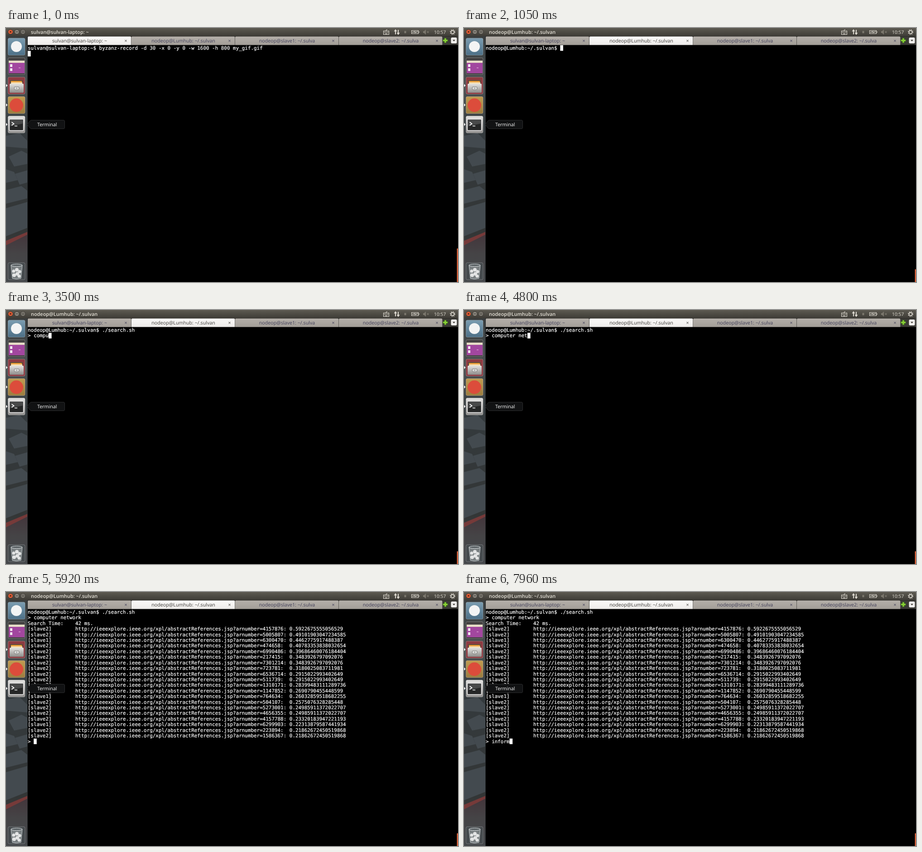
These frames come from a looping animation (998 px wide and 561 px high, 8000 ms). An HTML page:

```html
<!DOCTYPE html>
<html lang="en">
<head>
<meta charset="utf-8">
<title>Terminal search</title>
<style>
html, body { margin: 0; width: 100%; height: 100%; overflow: hidden; background: #000; }
svg { display: block; width: 998px; height: 561px; }
text { text-rendering: geometricPrecision; white-space: pre; }
.ui { font-family: "Open Sans", "Noto Sans", sans-serif; font-size: 10.7px; }
.mono { font-family: "DejaVu Sans Mono", monospace; font-size: 10.92px; fill: #fff; stroke: #fff; stroke-width: .22px; }
.title { font-weight: 600; font-size: 10.9px; fill: #e6e2d8; }
.tab path { fill: url(#tabOff); }
.tab.on path { fill: url(#tabOn); }
.tab text { fill: #42405a; text-anchor: middle; }
.tab.on text { fill: #403e3b; }
.panel { fill: none; stroke: #dfdbd2; stroke-width: 1.1; }
.panel.dim { stroke: #7b776d; }
</style>
</head>
<body>
<svg viewBox="0 0 998 561" xmlns="http://www.w3.org/2000/svg">
  <defs>
    <linearGradient id="bar" x2="0" y2="1"><stop stop-color="#5d5a51"/><stop offset="1" stop-color="#3d3b36"/></linearGradient>
    <linearGradient id="tabOn" x2="0" y2="1"><stop stop-color="#fbfaf9"/><stop offset="1" stop-color="#edebe9"/></linearGradient>
    <linearGradient id="tabOff" x2="0" y2="1"><stop stop-color="#b4afa9"/><stop offset="1" stop-color="#a39e98"/></linearGradient>
    <linearGradient id="photo" x2="0" y2="1">
      <stop stop-color="#393d3e"/><stop offset=".2" stop-color="#4a5051"/><stop offset=".4" stop-color="#343a3d"/>
      <stop offset=".8" stop-color="#333636"/><stop offset="1" stop-color="#434648"/>
    </linearGradient>
    <linearGradient id="rest" x2="0" y2="1"><stop stop-color="#43343a"/><stop offset=".45" stop-color="#454446"/><stop offset="1" stop-color="#45484b"/></linearGradient>
    <linearGradient id="steel" x2="0" y2="1"><stop stop-color="#e4e3e1"/><stop offset="1" stop-color="#8e8d8b"/></linearGradient>
    <linearGradient id="blue" x2="0" y2="1"><stop stop-color="#7b9db1"/><stop offset="1" stop-color="#4d7087"/></linearGradient>
    <linearGradient id="tan" x2="0" y2="1"><stop stop-color="#c19b50"/><stop offset="1" stop-color="#9c7d40"/></linearGradient>
  </defs>

  <rect width="998" height="561"/>
  <g id="rows" class="mono"></g>
  <rect id="cursor" width="6.6" height="12.4" fill="#fff"/>
  <rect id="scroll" x="995.6" width="2.4" fill="#e0643c"/>

  <!-- launcher -->
  <rect y="18" width="48" height="543" fill="url(#photo)"/>
  <g fill="#434a4f">
    <path d="M0 238L30 232 48 250V266L0 262z"/>
    <path d="M6 284L34 271 48 278V300L18 306z"/>
    <path d="M0 312L18 318 26 336 0 342z"/>
    <path d="M20 322L48 314V341L30 346z"/>
    <path d="M0 358L34 349 48 360V376L0 388z"/>
    <path d="M0 398L48 384V441L0 460z"/>
  </g>
  <path d="M0 470L48 450V561H0z" fill="url(#rest)"/>
  <path d="M0 470L48 450V456L0 480z" fill="#763a39"/>
  <path d="M47.5 18V561" stroke="#26292b"/>

  <g id="tiles" stroke="#ffffff55" stroke-width=".8"></g>
  <circle cx="23" cy="41" r="12" fill="#f3f4f4"/>

  <path d="M6 72H41V78H6z" fill="#e6dcc6"/>
  <path d="M6 77H41V100H6z" fill="#a2479f"/>
  <path d="M9 80h5v6h-5zM9 89h5v6h-5z" fill="#f1e6ef"/>
  <path d="M28 88h4" stroke="#d79bd0" stroke-width="1.5"/>

  <path d="M9 115H37V127H9z" fill="#5b4a3a"/>
  <path d="M11 117H35V126H11z" fill="#efa23c"/>
  <path d="M11 120H36V126H11z" fill="#f5dfb4"/>
  <rect x="8" y="123" width="31" height="20" rx="1.5" fill="url(#steel)"/>
  <rect x="18.500" y="130" width="10" height="6" rx="1" fill="#f3f3f2" stroke="#6d6c6a"/>
  <path d="M21 133h5" stroke="#6d6c6a" stroke-width="1.3"/>

  <circle cx="23" cy="170.500" r="15" fill="#dc4c3b"/>

  <rect x="7.500" y="201.500" width="31" height="25" rx="1.5" fill="#262727" stroke="#f3f3f3" stroke-width="1.4"/>
  <path d="M8.500 202.500H37.500V211L8.500 217z" fill="#484949"/>
  <path d="M12.500 208l5 3.500-5 3.500M19 216.500h6" fill="none" stroke="#fff" stroke-width="1.7"/>

  <path d="M11 524H36L33 553Q23 556 14 553z" fill="#9da3a599" stroke="#c9cfd1"/>
  <ellipse cx="23.500" cy="524" rx="12.500" ry="2.800" fill="#5d6467" stroke="#dfe3e4"/>
  <g fill="#e3e4e4">
    <circle cx="17" cy="537" r="3.500"/><circle cx="24" cy="534" r="4"/><circle cx="30" cy="538" r="3.500"/>
    <circle cx="18" cy="546" r="4"/><circle cx="25" cy="543" r="4"/><circle cx="29" cy="548" r="3.500"/>
  </g>
  <path d="M0 123.500L3.500 127 0 130.500zM0 166.500L3.500 170 0 173.500zM0 209.500L3.500 213 0 216.500z" fill="#e9e9e9"/>

  <!-- tooltip -->
  <path d="M46.500 213L53 205Q54 203.500 56 203.500H127Q129.500 203.500 129.500 206V220Q129.500 222.500 127 222.500H56Q54 222.500 53 221z" fill="#111213" stroke="#2b2c2d"/>
  <text class="ui" x="69" y="217" fill="#fff">Terminal</text>

  <!-- top panel -->
  <rect width="998" height="18.500" fill="url(#bar)"/>
  <circle cx="10" cy="8.500" r="5.300" fill="#e8623a" stroke="#35332e"/>
  <path d="M8 6.500l4 4m0-4l-4 4" stroke="#5c2413" stroke-width="1.2"/>
  <g fill="#87837a" stroke="#35332e"><circle cx="24" cy="8.500" r="5.200"/><circle cx="37.500" cy="8.500" r="5.200"/></g>
  <path d="M21.500 8.500h5M35.300 6.700h4.400v3.600h-4.400z" fill="none" stroke="#3d3b36"/>
  <text id="title" class="ui title" x="55" y="12.500"></text>

  <g class="panel">
    <path d="M833.500 6.500h12v8h-12zM839 6.500q0-3 3-3"/>
    <path d="M835 8.700h9M835 10.700h9" stroke-dasharray="1.2 .8"/><path d="M837 12.800h5"/>
    <path d="M860 14V5M866 4v9" stroke-width="2"/>
    <path d="M857.500 7l2.500-3.500 2.500 3.500zM863.500 11l2.500 3.500 2.500-3.500z" fill="#dfdbd2"/>
    <path d="M895.500 5.500h15v7h-15zM912 7.500v3"/>
    <path d="M897 9.500l6-1.500v2l6-2" stroke-width="1.5"/>
    <circle cx="986" cy="9" r="3.300" stroke-width="1.4"/>
    <circle cx="986" cy="9" r="5" stroke-width="2" stroke-dasharray="1.8 2.127"/>
  </g>
  <rect x="879.500" y="6.500" width="4" height="5" fill="#7b776d"/>
  <g class="panel dim">
    <path d="M921.500 7.500h2l3-3v9l-3-3h-2z" fill="#7b776d"/><path d="M929.500 7l4 4m0-4l-4 4"/>
  </g>
  <text class="ui" x="945" y="12.500" fill="#e6e2d8" style="font-size:10.300px">10:57</text>

  <!-- tab bar -->
  <rect x="48" y="18.500" width="950" height="19" fill="#3c3b37"/>
  <g id="tabs" class="ui"></g>
  <path d="M970 22v11M964.500 27.500h11" stroke="#3f7d17" stroke-width="4.600"/>
  <path d="M970 22.700v9.600M965.200 27.500h9.600" stroke="#8ad037" stroke-width="3"/>
  <rect x="982.500" y="21" width="13" height="13" rx="2.500" fill="#f1efed"/>
  <path d="M986 26h6l-3 3.500z" fill="#47453f"/>
</svg>

<script>
const LOOP = 8000, LEFT = 48, TOP = 38, CW = 6.575, LH = 12.42;
const $ = id => document.getElementById(id);
const add = (parent, tag, attrs, text = '') => {
  const el = document.createElementNS('http://www.w3.org/2000/svg', tag);
  for (const k in attrs) el.setAttribute(k, attrs[k]);
  el.textContent = text;
  parent.append(el);
  return el;
};

const tiles = [[22, 'url(#blue)'], [65, '#454343'], [108, '#8e3b42'], [151, 'url(#tan)'], [194, 'url(#steel)'], [518, '#454a4d']];
for (const [y, fill] of tiles)
  add($('tiles'), 'rect', { x: 4.4, y: y + .4, width: 37.6, height: 37.6, rx: 3, fill });

const names = ['sulvan@sulvan-laptop: ~', 'nodeop@Lumhub: ~/.sulvan', 'nodeop@slave1: ~/.sulva', 'nodeop@slave2: ~/.sulva'];
const tabs = names.map((name, i) => {
  const x = LEFT + i * 229, g = add($('tabs'), 'g', { class: 'tab' });
  add(g, 'path', { d: `M${x} 37.500V20.700q0-2 2-2h224.300q2 0 2 2V37.500z` });
  add(g, 'text', { x: x + 114.5, y: 31.7 }, name);
  add(g, 'text', { x: x + 216.5, y: 31.5 }, '×');
  return g;
});

const shell = 'sulvan@sulvan-laptop:~$ byzanz-record -d 30 -x 0 -y 0 -w 1600 -h 800 my_gif.gif';
const prompt = 'nodeop@Lumhub:~/.sulvan$ ';
const url = 'http://ieeexplore.ieee.org/xpl/abstractReferences.jsp?arnumber=';
// node, article, score
const hits = `2 4157876 5922675555056529
2 5005807 49101903047234585
1 6300470 4462775917488387
2 474658 40783353838032654
2 6990486 39686460076184404
2 217415 3483926797092076
2 7301214 3483926797092076
2 723781 3180025083711981
2 6536714 2915022993402649
2 511739 2915022993402649
2 1310171 28399483111289736
2 1147852 2690790455448599
1 764634 26032859518682255
2 504107 2575076328285448
2 5273001 24985911372022707
2 4656355 24985911372022707
2 4157788 23320183947221193
1 6299903 22313879587441934
2 223894 21862672450519868
2 1586367 21862672450519868`.split('\n').map(line => {
  const [node, id, score] = line.split(' ');
  return `[slave${node}]`.padEnd(16) + `${url}${id}:`.padEnd(72) + `0.${score}`;
});
const results = ['Search Time:    42 ms.', ...hits];

const query = [3180, 3260, 3340, 3420, 3500, 3620, 3725, 3830, 4250, 4530, 4650, 4800, 5110, 5250, 5390, 5550];
const next = [7370, 7490, 7610, 7720, 7840, 7960];
const blinks = [[550, 900], [2550, 3100], [6440, 7040]];
const typed = (word, times, t) => word.slice(0, times.filter(x => x <= t).length);

function linesAt(t) {
  if (t < 900) return [shell, ''];
  const out = [prompt + (t >= 1490 ? './search.sh ' : '')];
  if (t >= 1990) out.push(t < 2130 ? '' : '> ' + typed('computer network', query, t));
  if (t >= 5920) out.push(...results, '> ' + typed('inform', next, t));
  else if (t >= 5880) out.push('');
  return out;
}

const rows = Array.from({ length: 24 }, (_, i) =>
  add($('rows'), 'text', { x: LEFT, y: (TOP + 9.9 + i * LH).toFixed(2) }));
const put = (el, s) => { if (el.textContent !== s) el.textContent = s; };

function draw(t) {
  const lines = linesAt(t), last = lines.length - 1, active = t < 900 ? 0 : 1;
  rows.forEach((row, i) => put(row, (lines[i] || '').replace(/ /g, '\u00a0')));

  const cursor = $('cursor'), off = blinks.some(([a, b]) => t >= a && t < b);
  cursor.setAttribute('x', LEFT + lines[last].length * CW);
  cursor.setAttribute('y', TOP + last * LH);
  cursor.setAttribute('visibility', off ? 'hidden' : 'visible');

  tabs.forEach((tab, i) => tab.classList.toggle('on', i === active));
  put($('title'), names[t < 975 ? 0 : 1]);
  const y = active ? 533 : 487;
  $('scroll').setAttribute('y', y);
  $('scroll').setAttribute('height', 561 - y);
}

const start = performance.now();
function tick() {
  draw((performance.now() - start) % LOOP);
  requestAnimationFrame(tick);
}
tick();
</script>
</body>
</html>
```
